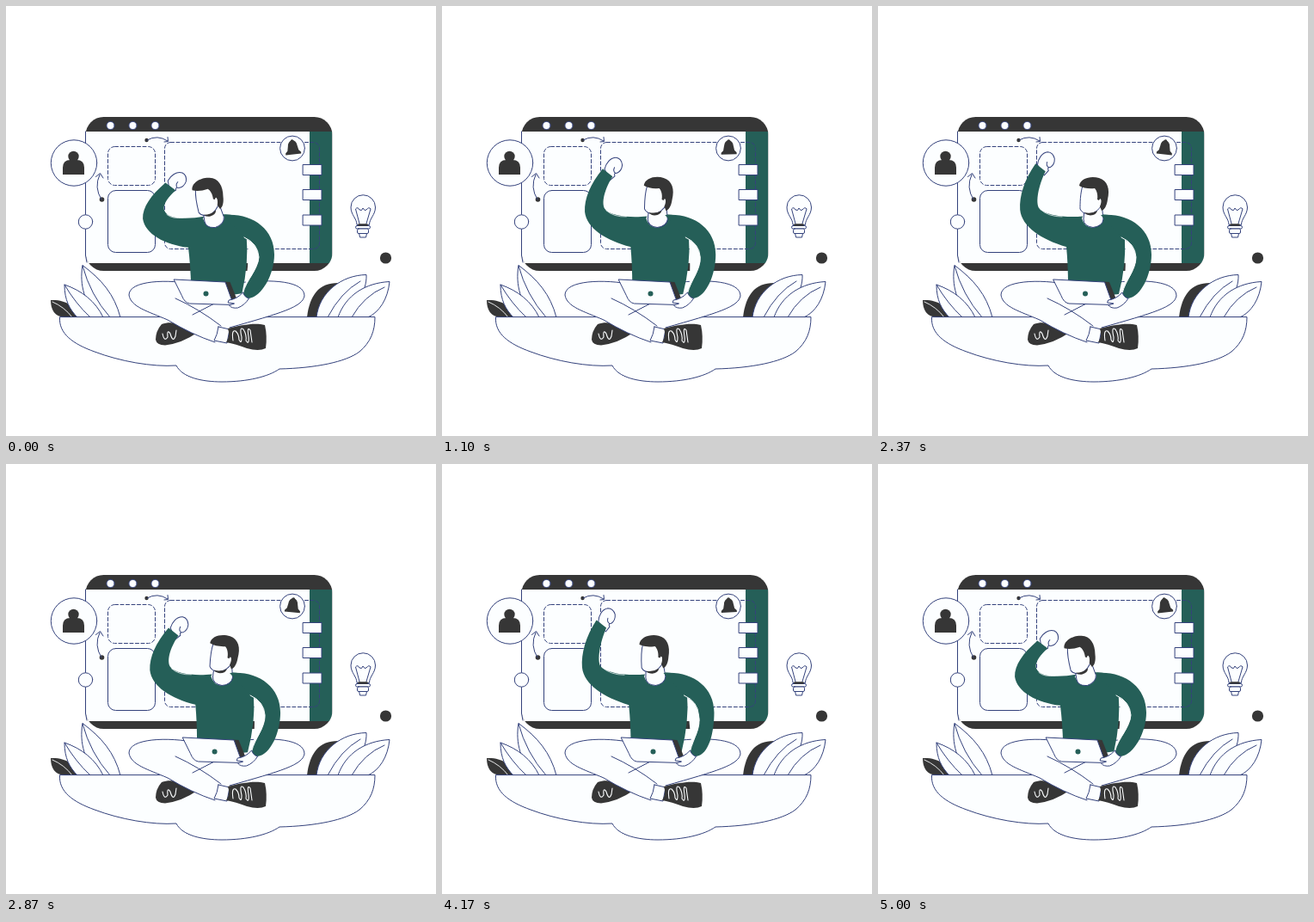
Recreate the animation shown at these times as an HTML page with a canvas. Size 500 by 500 pixels, loop 5.03 s.

```html
<!DOCTYPE html>
<html lang="en">
<head>
<meta charset="utf-8">
<title>Waving at work</title>
<style>
html, body { margin: 0; width: 100%; height: 100%; overflow: hidden; background: #fff; }
canvas { display: block; width: 500px; height: 500px; }
</style>
</head>
<body>
<canvas id="stage" width="500" height="500"></canvas>
<script>
const ctx = document.getElementById("stage").getContext("2d");
const LOOP = 5030;
const PALE = "#fcfeff", DARK = "#363636", GREEN = "#255f58", LINE = "#34427c";
const RAD = Math.PI / 180;

function draw(d, fill, stroke, width = 1) {
  const p = new Path2D(d);
  if (fill) { ctx.fillStyle = fill; ctx.fill(p); }
  if (stroke) { ctx.strokeStyle = stroke; ctx.lineWidth = width; ctx.stroke(p); }
}
function disc(x, y, r, fill, stroke) {
  ctx.beginPath();
  ctx.arc(x, y, r, 0, 7);
  ctx.fillStyle = fill;
  ctx.fill();
  if (stroke) { ctx.strokeStyle = stroke; ctx.lineWidth = 1; ctx.stroke(); }
}
function box(x, y, w, h, r, fill, stroke, dash = []) {
  ctx.beginPath();
  ctx.roundRect(x, y, w, h, r);
  if (fill) { ctx.fillStyle = fill; ctx.fill(); }
  if (stroke) {
    ctx.setLineDash(dash);
    ctx.strokeStyle = stroke;
    ctx.lineWidth = 1;
    ctx.stroke();
    ctx.setLineDash([]);
  }
}
function turned(x, y, deg, dx, dy, paint) {
  ctx.save();
  ctx.translate(x + dx, y + dy);
  ctx.rotate(deg * RAD);
  ctx.translate(-x, -y);
  paint();
  ctx.restore();
}

// Eased value between [time, value] keys
function track(keys, t) {
  let i = 0;
  while (i < keys.length - 2 && t > keys[i + 1][0]) i++;
  const [t0, a] = keys[i], [t1, b] = keys[i + 1];
  const k = Math.min(1, Math.max(0, (t - t0) / (t1 - t0)));
  return a + (b - a) * k * k * (3 - 2 * k);
}
const LEAN = [[0, 0], [630, .75], [1570, .81], [2370, .75], [3330, 1], [4170, .56], [4990, 0]];
const LAPTOP = [[0, -8.5], [630, 0], [1570, 3], [2370, 0], [3330, 3], [4170, 4.5], [4990, -8.5]];
const WAVE = [[0, 1], [630, .29], [838, .2], [1570, .74], [1677, .8], [2370, .1], [2515, .05],
  [3330, .98], [4170, 0], [4990, 1]];

function screen(t) {
  ctx.save();
  ctx.beginPath();
  ctx.roundRect(92.5, 129, 287, 179, 21);
  ctx.clip();
  ctx.fillStyle = DARK;
  ctx.fillRect(92, 129, 288, 180);
  ctx.fillStyle = PALE;
  ctx.fillRect(92, 146, 288, 153);
  ctx.fillStyle = GREEN;
  ctx.fillRect(353, 146, 26, 153);
  ctx.restore();
  draw("M92.500 146V290L94 298", null, LINE);
  for (const x of [121.5, 147.5, 173.5]) disc(x, 139, 4.6, PALE, LINE);

  box(118.5, 163.5, 55, 45, 8, null, LINE, [4, 2.5]);
  box(184.5, 158.5, 180, 124, 7, null, LINE, [4, 2.5]);
  box(118.5, 214.5, 55, 72, 9, PALE, LINE);
  for (const y of [184.5, 213.5, 243]) box(345.5, y, 21.5, 12, 0, PALE, LINE);
  disc(92.5, 251, 8.2, PALE, LINE);

  disc(163.5, 156, 2.2, DARK);
  draw("M164 156Q176 149 188 157M184 158L188.5 157.5L188 152.5", null, LINE);
  disc(111.5, 225, 2.8, DARK);
  draw("M111 225Q102 211 109 196M104.500 198.500L109.500 194.500L113 200", null, LINE);

  disc(79, 182.5, 26.7, PALE, LINE);
  disc(78.5, 175, 6.2, DARK);
  draw("M66 196V188Q66 179 75 179H82Q91 179 91 188V196Z", DARK);

  disc(333, 165.5, 14.4, PALE, LINE);
  turned(333.5, 165, -6 * Math.cos(2 * Math.PI * t / LOOP), 0, 0, () => {
    disc(333.5, 157, 1.8, DARK);
    draw("M333.500 156Q338.500 157 339 163L340 168L342.500 170.500V172.500H324.500V170.500L327 168L328 163Q328.500 157 333.500 156Z", DARK);
  });
}

function scenery() {
  // bulb and ball
  draw("M408 254C408 247 401 243 401 234A14.200 14.200 0 0 1 429.500 234C429.500 243 422.500 247 422.500 254Z", PALE, LINE);
  draw("M411 253L406.500 236Q409 233 411 237Q414 239 415 235Q417 239 419 237Q422 233 424 236L419 253", null, LINE);
  box(406.500, 255.500, 17, 3.500, 1.7, PALE, LINE);
  box(408.500, 259, 13, 5.500, 1.5, PALE, LINE);
  draw("M411 264.500H419.500L418.500 269H412Z", PALE, LINE);
  draw("M410.500 254.500H419.500", null, DARK, 2.6);
  disc(441.5, 293, 6.6, DARK);

  // left leaves
  draw("M83 362C81 349 69 341 52 342C52 354 57 361 68 362Z", DARK);
  draw("M54 344Q68 350 77 362", null, PALE, .9);
  draw("M133 362C126 335 111 318 89 301.500C85 325 92 345 106 362Z", PALE, LINE);
  draw("M89 302Q98 336 121 362", null, LINE);
  draw("M113 362C104 343 88 331 68 324C68 342 74 353 83 362Z", PALE, LINE);
  draw("M68 324Q80 345 98 362", null, LINE);

  // right leaves
  draw("M350 362C353 336 364 322 386 322L380 362Z", DARK);
  draw("M361 362C364 333 390 313 419 312.500C420 333 405 352 387 362Z", PALE, LINE);
  draw("M412 320Q389 333 374 362", null, LINE);
  draw("M386 362C395 336 418 322 446 320.500C444 341 434 356 421 362Z", PALE, LINE);
  draw("M440 327Q416 337 402 362", null, LINE);

  draw("M62.500 362C61 381 78 393 103 402C132 413 170 420 198 418C205 432 228 437 251 437C281 437 305 431 318 422C360 421 395 414 411 402C424 391 429 378 429 362Z", PALE, LINE);
}

function head() {
  draw("M239 236L238 248Q238 256 249 257.500Q260 256 261 248L259 229Z", PALE, LINE);
  draw("M237 209C234 218 234 230 234 236Q236 241 244 242Q254 241 260 230L257 208Z", PALE, LINE);
  draw("M233 209C234 200 247 197 256 200C266 203 269 213 266 225C265 233 262 237 259 238L257 233C260 227 258 221 256 226L254 225C255 219 253 214 251 212Q240 213 233 209Z", DARK);
  draw("M239 240Q247 242 254 238Q253 243 246 243.500Q241 243 239 240Z", DARK);
}

function torso(u) {
  const mix = (hi, lo) => hi.map((v, i) => (v + (lo[i] - v) * u).toFixed(2)).join(" ");
  const hand = mix([195, 177], [209.5, 201.5]).split(" ").map(Number);

  turned(201, 184, -9 + 27 * u, hand[0] - 201, hand[1] - 184, () =>
    draw("M189.500 188C191 181 196 174.500 203 174.500Q209 175.500 210 183Q209.500 190 204 192.500Q200 192 201.500 196L196 201ZM202 192.500Q199 190 201 186", PALE, LINE));

  draw("M" + mix([182, 181], [194.5, 204]) +
    "C" + mix([169, 201], [177, 218]) + " " + mix([164, 220], [167, 232]) + " " + mix([165, 236], [167, 245]) +
    "C" + mix([167, 256], [169, 263]) + " " + mix([190, 271], [192, 276]) + " 219 280" +
    "Q221 300 221 325L262 337L280 335Q289 300 287 268V250Q273 242 261 242.500L238 244.500" +
    "C" + mix([220, 246], [222, 247]) + " " + mix([194, 244], [199, 247]) + " " + mix([186, 234], [194, 239]) +
    "C" + mix([182, 224], [188, 232]) + " " + mix([188, 202], [196, 222]) + " " + mix([193.5, 190], [206, 213]) + "Z", GREEN);
  draw("M" + mix([188, 236], [195, 241]) + "Q" + mix([198, 245], [202, 247]) + " 214 245", null, PALE, .7);
  draw("M237 247Q240 257 249 257.500Q259 257 262 246L258 240H240Z", PALE);
}

function legs() {
  draw("M216 323L282 322L300 354L258 376L218 379Z", PALE);
  draw("M181 370C192 366 207 369 222 380Q205 392 185 394.500Q175 394 174 388Q174 378 181 370Z", DARK);
  draw("M182 381Q184 391 188 385Q187 375 191 381Q194 392 197 384L198 377", null, PALE, 1.1);
  const thigh = "M270 322C310 317 347 320 347 337C345 350 320 357 260 374";
  draw(thigh + "Q240 382 218 379L207 372Q211 362 230 354L270 334Z", PALE);
  draw(thigh, null, LINE);
  draw("M222 324C188 317 143 319 143 336C145 350 165 355 188 365Q216 382 243 391L252 374L250 350Z", PALE);
  draw("M222 324C188 317 143 319 143 336C145 350 165 355 188 365Q216 382 243 391M197 340Q224 352 250 372", null, LINE);
  draw("M217 359L252 341", null, LINE);
  draw("M247 373L260 376L257 392L242 389Q246 382 247 373Z", PALE, LINE);
  draw("M258 375C273 371 290 368 301 371Q304 384 302 398Q294 402 280 398Q267 393 256 391Q261 383 258 375Z", DARK);
  draw("M264 389Q262 376 267 378Q271 382 271 388Q274 394 274 385Q271 372 276 376Q280 382 279 389Q283 395 282 384Q280 372 284 377L286 391", null, PALE, 1.1);
}

function laptop() {
  draw("M262 320.500L269 321L277 341L273 348Z", DARK);
  draw("M204 318L263.500 321L273 347.500L222 346Q216 345 213 337Z", PALE, LINE);
  disc(241, 334.5, 3, GREEN);
}

// Shoulder follows the body (b), wrist follows the laptop (w)
function rightArm(b, w) {
  const m = (b + w) / 2;
  const at = (x, y, s) => (x + s).toFixed(2) + " " + y;
  draw("M" + at(287, 271, b) + "Q" + at(299, 279, b) + " " + at(300, 293, b) +
    "C" + at(300, 307, m) + " " + at(290, 318, w) + " " + at(286, 328, w) +
    "Q" + at(289, 304, b) + " " + at(287, 271, b) + "Z", PALE);
  draw("M" + at(259, 243, b) +
    "C" + at(291, 240, b) + " " + at(318, 258, b) + " " + at(318, 289, b) +
    "C" + at(318, 312, b) + " " + at(306, 338, w) + " " + at(291, 340, w) +
    "Q" + at(285, 339, w) + " " + at(284, 334, w) +
    "C" + at(287, 320, w) + " " + at(301, 307, m) + " " + at(300, 292, b) +
    "Q" + at(298, 276, b) + " " + at(284, 270, b) + "Z", GREEN);
  draw("M" + at(283, 269, b) + "Q" + at(299, 276, b) + " " + at(300, 292, b) +
    "C" + at(300, 307, m) + " " + at(288, 318, w) + " " + at(284, 334, w), null, PALE);
  turned(0, 0, 0, w, 0, () =>
    draw("M268 342Q277 341 284 333Q286 339 291 340Q286 348 278 351Q271 352 268 348L274 346L267 345Z", PALE, LINE));
}

function frame(now) {
  const t = now % LOOP;
  const lean = track(LEAN, t) - .75;
  const shift = 8 * lean, slide = track(LAPTOP, t), wave = track(WAVE, t);
  ctx.fillStyle = "#fff";
  ctx.fillRect(0, 0, 500, 500);
  ctx.lineJoin = ctx.lineCap = "round";
  screen(t);
  scenery();
  legs();
  turned(250, 320, 2 * lean, shift, 0, () => {
    torso(wave);
    turned(249, 250, 17 * lean, 1, 0, head);
  });
  turned(0, 0, 0, slide, 0, laptop);
  rightArm(shift, slide);
  requestAnimationFrame(frame);
}
requestAnimationFrame(frame);
</script>
</body>
</html>
```
